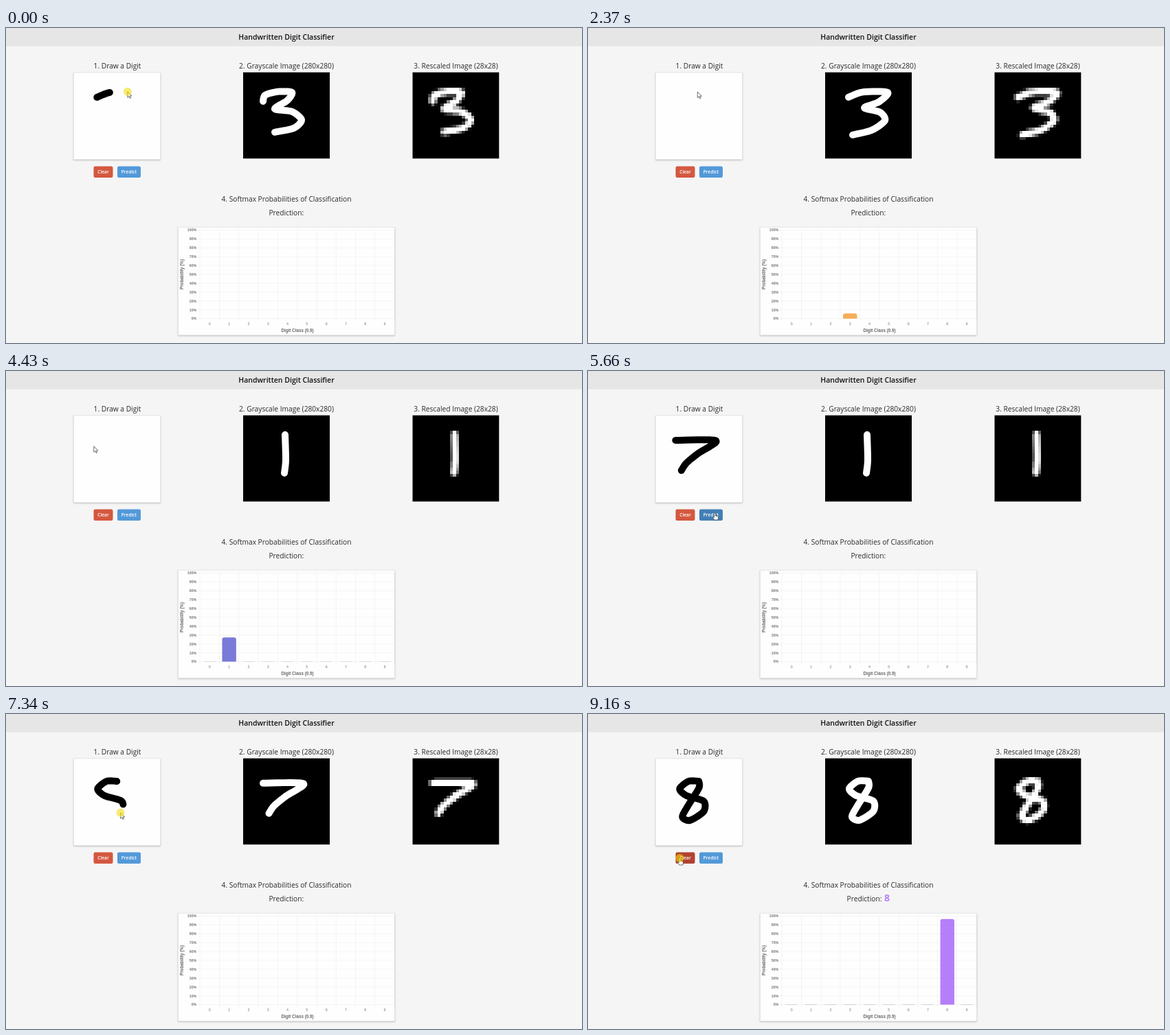
An HTML page with a canvas for the animation above (9230 ms loop, 838 by 459 pixels).

```html
<!DOCTYPE html>
<html lang="en">
<head>
<meta charset="utf-8">
<title>Handwritten Digit Classifier</title>
<style>
  html, body { margin: 0; width: 100%; height: 100%; overflow: hidden; background: #f5f5f5; }
  svg, canvas { position: absolute; display: block; }
  svg { left: 0; top: 0; }
  canvas { left: 592px; top: 65px; width: 125px; height: 125px; image-rendering: pixelated; }
  text { font-family: "Open Sans", "Noto Sans", sans-serif; font-size: 10.2px; fill: #2a2a2a; text-anchor: middle; }
  .title { font-size: 10.5px; font-weight: 600; fill: #111; }
  .button { font-size: 6.6px; font-weight: 600; fill: #fff; }
  .value { font-size: 14px; font-weight: 700; }
  .axis text { font-family: "Liberation Sans", Arial, sans-serif; font-size: 5.3px; fill: #777; }
  .axis .name { font-size: 6.3px; font-weight: bold; fill: #666; }
  .axis .percent { text-anchor: end; font-weight: bold; }
  .axis path { stroke: #000; stroke-opacity: .07; stroke-width: .6; }
  .card { fill: #fefefe; stroke: #e2e2e2; stroke-width: .7; filter: drop-shadow(0 1px 1.2px rgba(0,0,0,.22)); }
  .ink { fill: none; stroke-width: 10; stroke-linecap: round; stroke-linejoin: round; }
</style>
</head>
<body>
<svg width="838" height="459" viewBox="0 0 838 459">
  <defs><clipPath id="plot"><rect x="282" y="290" width="284" height="133.6"/></clipPath></defs>
  <rect width="838" height="26.5" fill="#e6e6e6"/>
  <text class="title" x="408" y="17">Handwritten Digit Classifier</text>
  <text x="162" y="58.5">1. Draw a Digit</text>
  <text x="408" y="58.5">2. Grayscale Image (280x280)</text>
  <text x="654.5" y="58.5">3. Rescaled Image (28x28)</text>
  <rect class="card" x="98.4" y="65" width="126.2" height="126.4"/>
  <rect x="345" y="64.6" width="126" height="125.6"/>
  <rect x="591.5" y="64.6" width="125.8" height="125.6"/>
  <polyline id="ink" class="ink" stroke="#000" transform="translate(98.3 65)"/>
  <polyline id="gray" class="ink" stroke="#fff" transform="translate(345 64.8)"/>
  <rect id="clear" x="127.5" y="201.5" width="28" height="16.5" rx="2.2"/>
  <rect id="predict" x="162" y="201.5" width="34" height="16.5" rx="2.2"/>
  <text class="button" x="141.5" y="212.2">Clear</text>
  <text class="button" x="179" y="212.2">Predict</text>
  <text x="408" y="252.6">4. Softmax Probabilities of Classification</text>
  <text x="407.8" y="273">Prediction:<tspan id="value" class="value"></tspan></text>
  <rect class="card" x="250.5" y="290.3" width="315" height="157"/>
  <g id="axis" class="axis">
    <text class="name" x="424" y="443.2">Digit Class (0.9)</text>
    <text class="name" transform="translate(258.2 359) rotate(-90)">Probability (%)</text>
  </g>
  <g id="bars" clip-path="url(#plot)"></g>
  <g id="cursor">
    <path id="arrow" d="M0 0V8.6L2 6.8L3.4 9.8L4.7 9.2L3.4 6.3H6Z" fill="#fff" stroke="#333" stroke-width=".7"/>
    <path id="hand" d="M-1 .8Q0-.6 1 .8V4L4.4 5Q5.4 5.4 5.2 7L4.5 10H-.8L-3 6.4Q-2.8 5-1 6.4Z" fill="#fff" stroke="#333" stroke-width=".7"/>
    <circle id="press" r="6" fill="#f5dc10" fill-opacity=".6"/>
  </g>
</svg>
<canvas id="small" width="28" height="28"></canvas>
<script>
const $ = id => document.getElementById(id);
const LOOP = 9230, STEP = LOOP / 136;
const BASE = 423.5, PERCENT = 1.29, SLOT = 28.3, LEFT = 282.2;
const CLEAR = [133.5, 210], PREDICT = [184.5, 207];

const clamp = v => Math.max(0, Math.min(1, v));
const easeOut = v => 1 - (1 - clamp(v)) ** 4;
const mix = (a, b, f) => a.map((v, k) => v + (b[k] - v) * f);

// Smooth pen path through a few key points
function pen(...keys) {
  const at = i => keys[Math.max(0, Math.min(keys.length - 1, i))];
  const path = [keys[0]];
  for (let i = 0; i < keys.length - 1; i++) {
    const bend = (j, k) => (at(j + 1)[k] - at(j - 1)[k]) * .4;
    for (let n = 1; n <= 8; n++) {
      const f = n / 8, g = 1 - f;
      path.push([0, 1].map(k => g * g * (1 + 2 * f) * at(i)[k] + f * f * (3 - 2 * f) * at(i + 1)[k]
        + f * g * g * bend(i, k) - f * f * g * bend(i + 1, k)));
    }
  }
  return path;
}

const firstShape = pen([29,42], [32,33], [50,28], [71,29], [64,41], [46,53], [71,57], [85,69], [74,81], [46,87]);
const rounds = [
  { digit: 3, color: '#f5ad57', from: -150, to: 480, predict: 1240, clear: 1870, odds: { 3: 99 },
    path: pen([34,36], [55,28.5], [91,29], [78,43], [57,51.5], [80,58], [87,70], [68,84], [40,91]) },
  { digit: 1, color: '#7a7ad8', from: 2440, to: 2800, predict: 3430, clear: 4138, odds: { 1: 99 },
    path: pen([61,28], [62,65], [60,84]) },
  { digit: 7, color: '#ee6a75', from: 4500, to: 5220, predict: 5840, clear: 6400, odds: { 2: 11, 3: 1, 7: 87, 8: 1 },
    path: pen([29,36], [88,36.5], [62,55], [45,69], [37.5,80]) },
  { digit: 8, color: '#b57efb', from: 6740, to: 7930, predict: 8400, clear: LOOP, odds: { 8: 97 },
    path: pen([63,33], [48,33], [35,44], [45,54], [70,62], [70,77], [50,90], [39,85], [47,69], [63,43], [63,33]) }
];

function partOf(path, share) {
  const lengths = path.slice(1).map((p, i) => Math.hypot(p[0] - path[i][0], p[1] - path[i][1]));
  let left = share * lengths.reduce((a, b) => a + b);
  const part = [path[0]];
  for (let i = 0; i < lengths.length && left > 0; i++) {
    part.push(mix(path[i], path[i + 1], Math.min(1, left / lengths[i])));
    left -= lengths[i];
  }
  return part;
}

function add(parent, tag, attrs, label = '') {
  const node = document.createElementNS('http://www.w3.org/2000/svg', tag);
  for (const key in attrs) node.setAttribute(key, attrs[key]);
  node.textContent = label;
  return parent.appendChild(node);
}

function buildChart() {
  for (let i = 0; i <= 10; i++) {
    const x = LEFT + i * SLOT, y = BASE - i * 10 * PERCENT;
    add($('axis'), 'path', { d: `M278 ${y}H565.2M${x} 294.5V427` });
    add($('axis'), 'text', { x: 277.3, y: y + 1.9, class: 'percent' }, i * 10 + '%');
    if (i < 10) add($('axis'), 'text', { x: x + SLOT / 2, y: 433 }, i);
  }
  return Array.from({ length: 10 }, (_, i) => add($('bars'), 'rect',
    { x: LEFT + (i + .5) * SLOT - 10.2, width: 20.4, rx: 3 }));
}

function showImage(path) {
  $('gray').setAttribute('points', path.join(' '));
  const c = $('small').getContext('2d');
  c.reset();
  c.fillRect(0, 0, 28, 28);
  c.scale(28 / 126, 28 / 126);
  c.filter = 'blur(.35px)';
  c.strokeStyle = '#fff';
  c.lineWidth = 10;
  c.lineCap = c.lineJoin = 'round';
  c.beginPath();
  path.forEach(p => c.lineTo(...p));
  c.stroke();
}

function pointer(t) {
  const next = rounds.findIndex(r => t < r.from);
  const i = next < 0 ? rounds.length - 1 : next - 1;
  const onPad = ([x, y]) => [x + 98.3, y + 65];
  const { path, from, to, predict, clear } = rounds[i];
  const travel = (a, b, start, end) => mix(a, b, clamp((t - start) / (end - start)));
  if (t < to) return onPad(partOf(path, (t - from) / (to - from)).pop());
  if (t < predict) return travel(onPad(path.at(-1)), PREDICT, to + 40, to + 320);
  if (t < clear) return travel(PREDICT, CLEAR, predict + 50, predict + 250);
  const { path: goal, from: begin } = rounds[i + 1];
  return travel(CLEAR, onPad(goal[0]), clear + 60, begin - 70);
}

const bars = buildChart();
let shown;

function draw(t) {
  const inked = rounds.find(r => t >= r.from && t < r.clear);
  $('ink').style.display = inked ? '' : 'none';
  if (inked) {
    const share = clamp((t - 85 - inked.from) / (inked.to - inked.from));
    $('ink').setAttribute('points', partOf(inked.path, share).join(' '));
  }

  const last = rounds.findLast(r => t >= r.predict);
  const image = last ? last.path : firstShape;
  if (image !== shown) showImage(shown = image);

  const active = last && t < last.clear;
  $('value').textContent = active ? ' ' + last.digit : '';
  $('value').style.fill = active ? last.color : '';

  const level = last ? easeOut((Math.min(t, last.clear) - last.predict) / 1000)
    * (1 - easeOut((t - last.clear) / 1000)) : 0;
  bars.forEach((bar, i) => {
    const odds = last?.odds[i];
    const height = (odds || .2) * PERCENT * level;
    bar.setAttribute('fill', odds ? last.color : '#999');
    bar.setAttribute('y', BASE - height);
    bar.setAttribute('height', height > .02 ? height + 4 : 0);
  });

  const [x, y] = pointer(t);
  const over = (a, b) => y > 201 && y < 218 && x > a && x < b;
  const onClear = over(127, 156), onPredict = over(162, 196);
  $('clear').setAttribute('fill', onClear ? '#b0432f' : '#d4583f');
  $('predict').setAttribute('fill', onPredict ? '#427fb5' : '#5299d9');
  const pressed = rounds.some(r => (t >= r.from && t < r.to) ||
    [r.predict, r.clear].some(c => Math.abs(t - c) < 75));
  $('cursor').setAttribute('transform', `translate(${x} ${y})`);
  $('press').style.display = pressed ? '' : 'none';
  $('hand').style.display = onClear || onPredict ? '' : 'none';
  $('arrow').style.display = onClear || onPredict ? 'none' : '';
}

const start = performance.now();
function tick() {
  const t = (performance.now() - start) % LOOP;
  draw(Math.min(135, Math.floor((t + 25) / STEP)) * STEP);
  requestAnimationFrame(tick);
}
tick();
</script>
</body>
</html>
```
